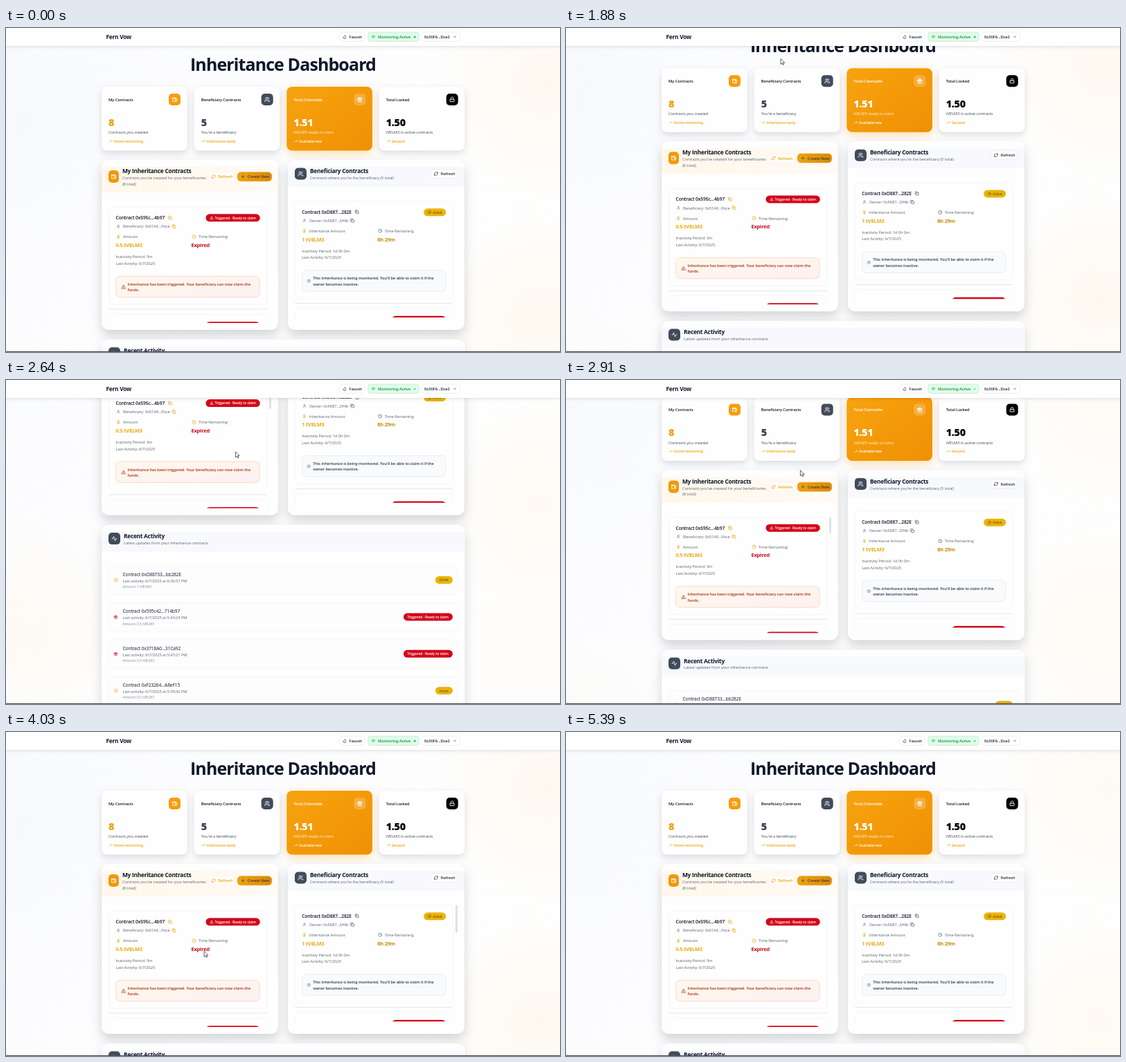
Write an HTML page that moves like this. It is 800 px wide and 469 px high and loops after 5420 ms.

```html
<!DOCTYPE html>
<html lang="en">
<head>
<meta charset="utf-8">
<title>Inheritance Dashboard</title>
<style>
html, body { margin: 0; width: 100%; height: 100%; overflow: hidden; background: #fff }
svg { display: block; width: 800px; height: 469px }
text { font-family: "Open Sans", "Noto Sans", sans-serif; letter-spacing: -.02em; white-space: pre }
text.bold { letter-spacing: -.03em }
.card { filter: drop-shadow(0 4px 5px #0f172a24) }
.panel { filter: drop-shadow(0 8px 8px #0f172a2e) }
.glow { filter: drop-shadow(0 4px 8px #f59e0b55) }
.bar { filter: drop-shadow(0 1px 2px #0002) }
</style>
</head>
<body>
<svg id="stage" viewBox="0 0 800 469"></svg>
<script>
const LOOP = 5420;
const AMBER = '#f2a20c', SLATE = '#414b5a', GRAY = '#5d6573', INK = '#0f172a', RED = '#d30519', GOLD = '#eab308';
const TOKEN = 'tVELM3';

const ICONS = {
  wallet: 'M4 5h14v3M4 5v15h16V8H4M20 12h-4a2 2 0 0 0 0 4h4',
  users: 'M16 21v-2a4 4 0 0 0-4-4H6a4 4 0 0 0-4 4v2M13 7a4 4 0 1 1-8 0a4 4 0 0 1 8 0M22 21v-2a4 4 0 0 0-3-3.9M16 3.1a4 4 0 0 1 0 7.8',
  gift: 'M3 8h18v4H3zM12 8v13M5 12v9h14v-9M12 8C7 8 6 3 9 3s3 5 3 5s0-5 3-5s2 5-3 5',
  lock: 'M4 11h16v10H4zM7 11V7a5 5 0 0 1 10 0v4',
  trend: 'M2 17l7-7 5 5 8-8M16 7h6v6',
  copy: 'M9 9h12v12H9zM5 15H3V3h12v2',
  user: 'M19 21v-2a4 4 0 0 0-4-4H9a4 4 0 0 0-4 4v2M16 7a4 4 0 1 1-8 0a4 4 0 0 1 8 0',
  dollar: 'M12 2v20M17 5H9.5a3.5 3.5 0 0 0 0 7h5a3.5 3.5 0 0 1 0 7H6',
  clock: 'M22 12a10 10 0 1 1-20 0a10 10 0 0 1 20 0M12 6v6l4 2',
  warn: 'M12 3L2 21h20zM12 10v4M12 17v.5',
  refresh: 'M3 12a9 9 0 0 1 15-6.7L21 8M21 3v5h-5M21 12a9 9 0 0 1-15 6.7L3 16M3 21v-5h5',
  plus: 'M12 4v16M4 12h16',
  pulse: 'M22 12h-4l-3 9L9 3l-3 9H2',
  wifi: 'M2 9a15 15 0 0 1 20 0M5 13a10 10 0 0 1 14 0M8.5 16.5a5 5 0 0 1 7 0M12 20h.01',
  drop: 'M12 22a7 7 0 0 0 7-7c0-4-4-6-5-11c-2 5-9 7-9 11a7 7 0 0 0 7 7',
  chevron: 'M6 9l6 6 6-6'
};

const rect = (x, y, w, h, r, fill, extra = '') =>
  `<rect x="${x}" y="${y}" width="${w}" height="${h}" rx="${r}" fill="${fill}" ${extra}/>`;
const box = (x, y, w, h, r, fill, stroke) =>
  rect(x + .25, y + .25, w - .5, h - .5, r, fill, `stroke="${stroke}" stroke-width=".6"`);
const text = (s, x, y, size = 5.83, fill = GRAY, weight = 400, extra = '') =>
  `<text x="${x}" y="${y}" font-size="${size}" fill="${fill}" font-weight="${weight}" class="${weight > 600 ? 'bold' : ''}" ${extra}>${s}</text>`;
// Icon centred on (x, y)
const icon = (name, x, y, size, color) =>
  `<path d="${ICONS[name]}" transform="translate(${x - size / 2} ${y - size / 2}) scale(${size / 24})" fill="none" stroke="${color}" stroke-width="2.4" stroke-linecap="round" stroke-linejoin="round"/>`;
const tile = (name, x, y, w, h, fill) =>
  rect(x, y, w, h, 5, fill) + icon(name, x + w / 2, y + h / 2, 8.3, '#fff');
const button = (name, label, x, y, w, h, color, fill = '#fff', stroke = '#e5e5e5') =>
  box(x, y, w, h, 5, fill, stroke) + icon(name, x + 8, y + h / 2, 6.4, color) +
  text(label, x + 14.8, y + h / 2 + 2.1, 5.83, color, 600);
const panel = (x, y, w, h) => rect(x, y, w, h, 10, '#fefefe', 'class="panel"');

function stat(x, label, value, note, trend, name, fill, color, active) {
  const main = active ? '#fff' : INK;
  return rect(x, 85, 123.7, 92.6, 8, active ? 'url(#amber)' : '#fefefe', `class="${active ? 'glow' : 'card'}"`) +
    text(label, x + 10, 105.5, 5.83, main, 600) + tile(name, x + 97, 95, 17, 17, fill) +
    text(value, x + 10, 141.8, 14.5, color, 800) +
    text(note, x + 10, 153.3, 5.83, active ? '#fff4dd' : '#3f4855') +
    icon('trend', x + 13, 164, 5.5, active ? '#fff' : AMBER) +
    text(trend, x + 18, 166, 5.1, active ? '#fff' : AMBER, 600);
}

function pill(name, label, x, y, w, fill, color) {
  const left = name ? 13 : 5.5;
  return rect(x, y, w, 11, 5.5, fill) + (name ? icon(name, x + 8.3, y + 5.5, 5, color) : '') +
    text(label, x + left, y + 7.4, 5, color, fill === RED ? 600 : 500);
}

// One contract entry with its top left corner at (x, y)
function contract(x, y, c) {
  return box(x, y, 228.5, 141.5, 7, '#fefefe', '#eef0f3') +
    text('Contract ' + c.id, x + 10, y + 18.2, 6.75, INK, 600) +
    icon('copy', x + (c.fired ? 88.5 : 89.5), y + 15.7, 6.5, c.tint) +
    (c.fired ? pill('warn', 'Triggered · Ready to claim', x + 140, y + 10.3, 78.3, RED, '#fff')
             : pill('clock', 'Active', x + 186, y + 10.8, 32, GOLD, '#5b4305')) +
    icon('user', x + 13.7, y + 28.2, 5.5, GRAY) + text(c.who, x + 20.5, y + 30.4) +
    icon('copy', x + (c.fired ? 94 : 83), y + 28.2, 6.5, c.tint) +
    icon('dollar', x + 13.7, y + 43.2, 6, AMBER) + text(c.amountLabel, x + 20.5, y + 45.4) +
    icon('clock', x + 123, y + 43.2, 6.3, c.fired ? AMBER : GRAY) + text('Time Remaining', x + 129.5, y + 45.4) +
    text(`${c.amount} ${TOKEN}`, x + 10, y + 58, 7.5, '#eaa90c', 700) +
    text(c.left, x + 119, y + 58, 7.5, c.fired ? '#c40a1c' : '#c58a0a', 700) +
    text('Inactivity Period: ' + c.period, x + 10, y + 74) + text('Last Activity: 6/7/2025', x + 10, y + 83.8) +
    box(x + 10, y + 100, 208, 31, 6, c.fired ? 'url(#alert)' : '#f8fafc', c.fired ? '#f8c7a4' : '#dfe4ec') +
    icon(c.fired ? 'warn' : 'clock', x + (c.fired ? 21 : 20), y + 115.7, c.fired ? 6.5 : 5, c.fired ? '#b4320e' : '#4b5563') +
    c.notice.map((s, i) => text(s, x + (c.fired ? 27 : 26), y + 113.8 + i * 8.3, 5.75, c.fired ? '#a5340f' : '#333c4a', 600)).join('') +
    rect(x, y + 147.7, 228.5, .7, 0, '#d9dbde') + box(x, y + 155, 228.5, 60, 7, '#fefefe', '#eef0f3') +
    rect(x + 140, y + 166.2, 78, 11, 5.5, RED);
}

function activity(i, id, when, amount, active) {
  const y = 510 + i * 53.4;
  return box(148, y, 504, 42, 7, '#fdfdfe', '#eef0f3') +
    icon(active ? 'clock' : 'gift', 158.5, y + 20.8, 6, active ? AMBER : '#d9163a') +
    text('Contract ' + id, 168.5, y + 15, 6.67, INK, 500) +
    text('Last activity: ' + when, 168.5, y + 24, 5.83) +
    text(`Amount: ${amount} ${TOKEN}`, 168.5, y + 32.5, 5, '#838a96') +
    (active ? pill('', 'Active', 620, y + 15.2, 25, GOLD, '#5b4305')
            : pill('', 'Triggered · Ready to claim', 574, y + 15.2, 71, RED, '#fff'));
}

const gradient = (id, stops, dir = 'x2="1" y2="1"') =>
  `<linearGradient id="${id}" x1="0" y1="0" ${dir}>${stops.map((c, i) => `<stop offset="${i / (stops.length - 1)}" stop-color="${c}"/>`).join('')}</linearGradient>`;
const blob = (x, y, r, color) => `<circle class="blob" cx="${x}" cy="${y}" r="${r}" fill="url(#${color})"/>`;
const radial = (id, color) => `<radialGradient id="${id}"><stop stop-color="${color}"/><stop offset="1" stop-color="${color}" stop-opacity="0"/></radialGradient>`;

const defs = '<defs>' +
  gradient('paper', ['#f9fafd', '#fefefe', '#fefdfb']) + gradient('amber', ['#f8a30e', '#ef9005']) +
  gradient('alert', ['#fff8ee', '#fdf0f1']) + gradient('warm', ['#fff7ea', '#fffaf5'], 'x2="1" y2="0"') +
  gradient('create', ['#eda313', '#d8880a'], 'x2="1" y2="0"') +
  radial('peach', '#fef8ee') + radial('mist', '#f7f9fd') +
  '<clipPath id="lists"><rect x="138" y="240" width="256" height="187"/><rect x="407" y="232" width="256" height="187"/></clipPath></defs>';

const page = '<g id="page">' +
  rect(0, 0, 800, 812, 0, 'url(#paper)') + blob(780, 80, 170, 'peach') + blob(20, 610, 170, 'peach') +
  blob(20, 130, 180, 'mist') + blob(770, 420, 150, 'peach') +
  text('Inheritance Dashboard', 400, 62.3, 25, INK, 700, 'text-anchor="middle" style="letter-spacing:-.036em"') +
  stat(138, 'My Contracts', '8', 'Contracts you created', 'Active monitoring', 'wallet', '#f59e0b', '#f5a00d') +
  stat(271.7, 'Beneficiary Contracts', '5', "You're a beneficiary", 'Inheritance ready', 'users', SLATE, '#374151') +
  stat(405.3, 'Total Claimable', '1.51', TOKEN + ' ready to claim', 'Available now', 'gift', '#ffffff38', '#fff', true) +
  stat(538.8, 'Total Locked', '1.50', TOKEN + ' in active contracts', 'Secured', 'lock', '#000', '#000') +

  panel(138, 191, 255, 246) + rect(138, 201, 255, 37, 0, 'url(#warm)') + tile('wallet', 148, 206, 15, 18, '#f09a0c') +
  text('My Inheritance Contracts', 168, 210.3, 8.33, INK, 700) +
  text("Contracts you've created for your beneficiaries", 168, 219.3) + text('(8 total)', 168, 227.6) +
  button('refresh', 'Refresh', 291.5, 208.5, 39, 13.5, AMBER, '#fffdfa', '#fdf0dc') +
  button('plus', 'Create New', 334, 208.5, 50, 13.5, '#4b3a22', 'url(#create)', '#e09a14') +

  panel(407, 191, 255, 246) + rect(407, 201, 255, 29, 0, '#f8f9fc') + tile('users', 417, 202.5, 17, 17, SLATE) +
  text('Beneficiary Contracts', 439, 210.3, 8.33, INK, 700) +
  text("Contracts where you're the beneficiary (5 total)", 439, 219.3) +
  button('refresh', 'Refresh', 613, 204.5, 39, 13, '#262d38') +

  '<g clip-path="url(#lists)">' +
  contract(148.5, 259, {
    id: '0x595c...4b97', fired: true, tint: AMBER, who: 'Beneficiary: 0x51A9...Fbce', amountLabel: 'Amount', amount: '0.5',
    left: 'Expired', period: '3m', notice: ['Inheritance has been triggered. Your beneficiary can now claim the', 'funds.']
  }) +
  contract(417.2, 250.5, {
    id: '0xD887...282E', tint: '#4b5563', who: 'Owner: 0xF6B7...Df4b', amountLabel: 'Inheritance Amount', amount: '1',
    left: '8h 29m', period: '1d 0h 0m',
    notice: ["This inheritance is being monitored. You'll be able to claim it if the", 'owner becomes inactive.']
  }) + '</g>' +
  rect(380, 259, 3, 24, 1.5, '#dfe1e4', 'id="thumbL"') + rect(649, 250.5, 3, 40, 1.5, '#dfe1e4', 'id="thumbR"') +

  panel(138, 451, 524.5, 324) + rect(138, 461, 524.5, 29, 0, '#f8f9fc') + tile('pulse', 148, 462.3, 17, 17, SLATE) +
  text('Recent Activity', 170, 470.3, 8.33, INK, 700) + text('Latest updates from your inheritance contracts', 170, 479) +
  [['0xD88733...bb282E', '6/7/2025 at 6:36:57 PM', 1, true],
   ['0x595c42...714b97', '6/7/2025 at 5:43:24 PM', .5],
   ['0x3718A0...31Ca92', '6/7/2025 at 5:43:21 PM', .5],
   ['0xF23264...A8eF15', '6/7/2025 at 5:39:42 PM', .5, true],
   ['0xcf66aF...8De111', '6/5/2025 at 4:53:36 PM', .5]].map((a, i) => activity(i, ...a)).join('') +
  rect(145, 781.7, 511, .7, 0, '#7b808a') +
  '<circle cx="148" cy="796" r="1.3" fill="#22a559"/>' +
  text('Fern Vow Contract System © 2025 · DIGITAL INHERITANCE PLATFORM', 156, 798) +
  text('Built for families and heirs', 538, 798) + '<rect x="633" y="793" width="6" height="6" fill="none" stroke="#6b7280" stroke-width=".6"/></g>';

const header = rect(0, 0, 800, 26, 0, '#fefefe', 'class="bar"') + text('Fern Vow', 144.5, 15.9, 8.33, INK, 700) +
  button('drop', 'Faucet', 481, 6, 37, 13.5, '#1b2430') +
  box(522.5, 6, 74, 13.5, 4, '#e3fbea', '#a7eabd') + icon('wifi', 530.5, 12.7, 6.4, '#16a34a') +
  text('Monitoring Active', 537, 14.9, 5.75, '#15913f', 600) + '<circle id="dot" cx="590.3" cy="12.9" r="1.5" fill="#22c55e"/>' +
  box(599.5, 6, 56.5, 13.5, 4, '#fff', '#e5e5e5') + text('0x30F6...Dce2', 604, 14.9, 5.83, '#1b2430', 600) +
  icon('chevron', 648, 12.9, 6.4, '#1b2430');

const pointer = '<g id="pointer"><path id="arrow" d="M0 0v8l2-1.7 1.3 2.7 1.3-.6-1.3-2.7h2.5z" fill="#fff" stroke="#222" stroke-width=".7"/>' +
  '<path id="beam" d="M-1.5-3H1.5M0-3V3M-1.5 3H1.5" fill="none" stroke="#222" stroke-width=".8"/></g>';

const $ = id => document.getElementById(id);
$('stage').innerHTML = defs + page + header + rect(0, 467.9, 800, 1.1, 0, '#4d5158') + pointer;
const blobs = document.querySelectorAll('.blob');

// Keys: [time, value, ...]
const SCROLL = [[1840, 0], [1880, 25], [1970, 190], [2060, 327], [2140, 340], [2480, 340], [2700, 205], [2910, 61], [3060, 0]];
const PATH = [[1620, 303, -12], [1880, 310, 44.5], [2060, 320, 54], [2500, 328, 90], [2910, 338, 130.5], [3300, 500, 225],
  [3560, 520, 300], [4030, 286, 317.5], [4350, 300, 280], [4750, 330, -12]];

function at(keys, t) {
  const i = keys.findIndex(k => k[0] > t);
  if (i === 0) return keys[0].slice(1);
  if (i < 0) return keys[keys.length - 1].slice(1);
  const a = keys[i - 1], b = keys[i], u = (t - a[0]) / (b[0] - a[0]);
  return a.slice(1).map((v, n) => v + (b[n + 1] - v) * u);
}
const during = (t, from, to) => Math.max(0, Math.min(1, (t - from) / 60, (to - t) / 60));

function draw() {
  const t = performance.now() % LOOP;
  const wave = Math.sin(Math.PI * t / 2000) ** 2;
  $('page').setAttribute('transform', `translate(0 ${-at(SCROLL, t)[0]})`);
  $('pointer').setAttribute('transform', `translate(${at(PATH, t)})`);
  const typing = t > 2000 && t < 2130;
  $('arrow').style.opacity = typing ? 0 : 1;
  $('beam').style.opacity = typing ? 1 : 0;
  $('thumbL').style.opacity = Math.max(during(t, 2060, 3350), during(t, 4040, 4800));
  $('thumbR').style.opacity = during(t, 3250, 4400);
  $('dot').style.opacity = 1 - .6 * wave;
  blobs.forEach(b => b.style.opacity = .9 - .3 * wave);
  requestAnimationFrame(draw);
}
draw();
</script>
</body>
</html>
```
